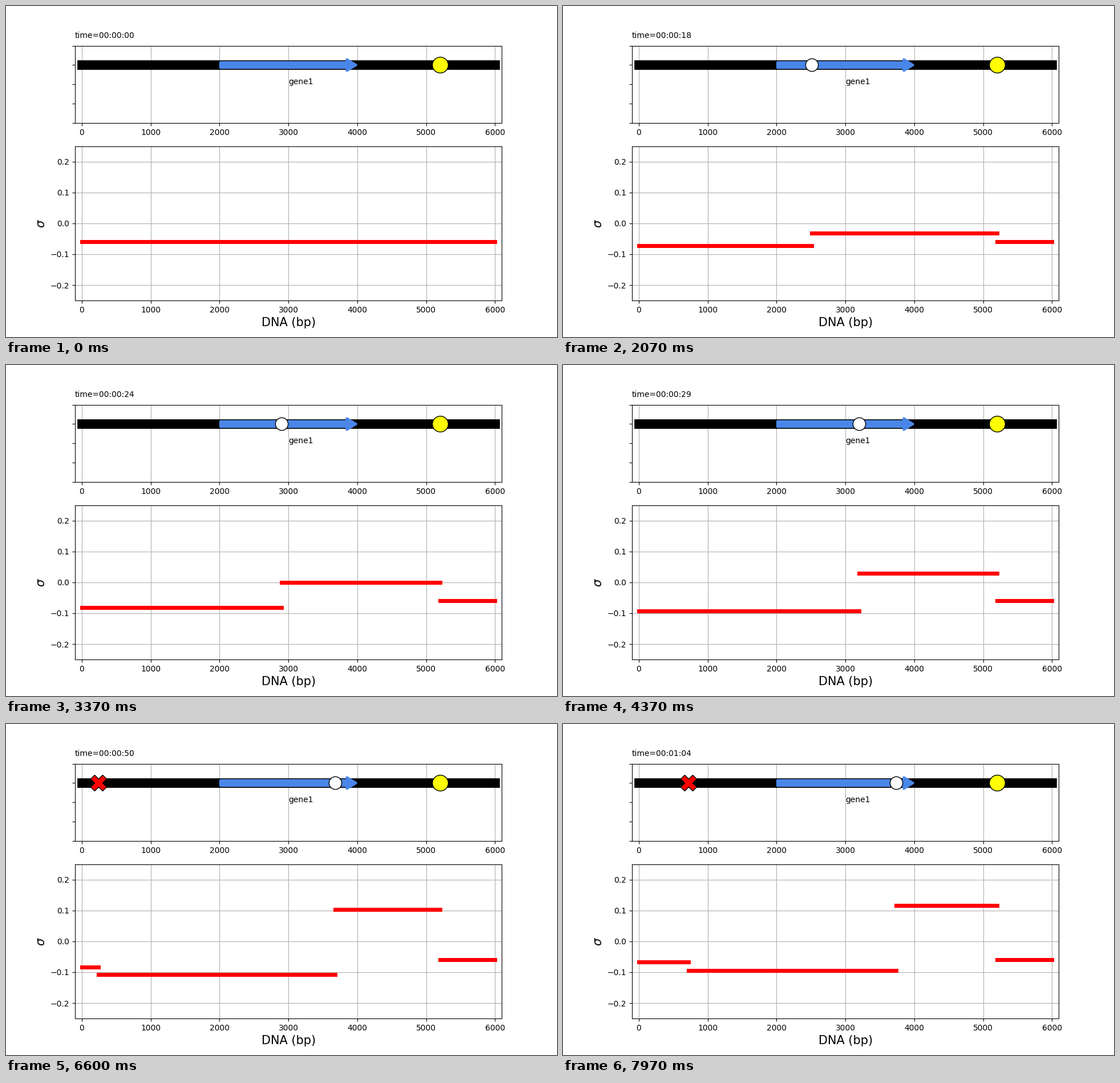
A matplotlib script for the animation above (8 s loop, 966 px wide and 580 px high).

```python
import numpy as np
import matplotlib.pyplot as plt
from matplotlib.animation import FuncAnimation
from matplotlib.patches import Polygon

LOOP, TICK = 8000, 20          # ms
DNA_LEN, BARRIER = 6000, 5200  # bp
START, STEP = 1970, 30         # polymerase start and stride, bp
SIGMA0, GAMMA = -0.06, 0.2055
STATES = 101

# topoisomerase visits: bind, leave, position, relaxation per step (left, right)
VISITS = [(14, 21, 1800, 3.3, 3.3),
          (35, 39, 2600, 3.3, 3.3),
          (78, 83, 240, 2.85, 1.55),
          (94, STATES, 720, 4.5, 4.5)]


def is_quick(k):
    """Idle states cover one second and are shown only briefly."""
    return k < 9 or 67 <= k < 78 or 85 <= k < 94


def polymerase(k):
    if k < 9:
        return None
    return START + STEP * (min(k - 9, 57) + int(np.clip(k - 83, 0, 2)))


def simulate():
    """List of (clock, polymerase, topoisomerase, segments) per state."""
    states, clock = [], 0.0
    left, right = SIGMA0 * START, 0.0
    ahead = SIGMA0 * (BARRIER - START)
    last = START
    for k in range(STATES):
        pos, topo = polymerase(k), None
        tail = (BARRIER, DNA_LEN, SIGMA0)
        if pos is None:
            segments = [(0, DNA_LEN, SIGMA0)]
        else:
            shift = GAMMA * (pos - last)
            last = pos
            ahead += shift
            right -= shift
            for bind, leave, site, gain_l, gain_r in VISITS:
                if bind < k <= leave:
                    left += gain_l
                    right += gain_r
                if bind <= k < leave:
                    topo = site
                if k == bind:
                    total = left + right
                    left = total * site / pos
                    right = total - left
            if topo is None:
                left, right = left + right, 0.0
                segments = [(0, pos, left / pos)]
            else:
                segments = [(0, topo, left / topo),
                            (topo, pos, right / (pos - topo))]
            segments += [(pos, BARRIER, ahead / (BARRIER - pos)), tail]
        states.append((clock, pos, topo, segments))
        clock += 1.0 if is_quick(k) else 0.5
    return states


states = simulate()
begins = np.cumsum([0] + [30 if is_quick(k) else 100 for k in range(STATES - 1)])

fig, (top, low) = plt.subplots(2, 1, figsize=(966 / 100, 580 / 100), dpi=100,
                               gridspec_kw={"height_ratios": [1, 2]})
for ax in (top, low):
    ax.set_xlim(-100, 6100)
    ax.set_xticks(range(0, 6001, 1000))

top.set_ylim(0, 2)
top.set_yticks(np.arange(0, 2.1, 0.5))
top.tick_params(labelleft=False)
top.grid(axis="x")
low.set_ylim(-0.25, 0.25)
low.set_yticks(np.arange(-2, 3) / 10)
low.grid()
low.set_xlabel("DNA (bp)", fontsize=15)
low.set_ylabel(r"$\sigma$", fontsize=15)

# DNA and gene
ROW = 1.5
top.plot([0, DNA_LEN], [ROW, ROW], color="black", lw=12, zorder=2)
upper = [(2014, 0.069), (3848, 0.069), (3848, 0.146)]
outline = upper + [(3982, 0)] + [(x, -y) for x, y in upper[::-1]]
top.add_patch(Polygon([(x, ROW + y) for x, y in outline], closed=True,
                      facecolor="#4a86e8", edgecolor="#4a86e8", lw=3,
                      joinstyle="round", zorder=3))
top.text(3000, 1.0, "gene1")
clock_text = top.text(-100, 2.2, "")


def marker(shape, size, color, z):
    return top.plot([BARRIER], [ROW], shape, ms=size, mfc=color,
                    mec="black", mew=1, zorder=z)[0]


marker("o", 20, "yellow", 5)
topo_mark = marker("X", 20, "red", 5)
pol_mark = marker("o", 16, "white", 6)
sigma_lines = [low.plot([], [], color="red", lw=5, zorder=3)[0] for _ in range(4)]


def place(mark, x):
    mark.set_visible(x is not None)
    if x is not None:
        mark.set_xdata([x])


def update(n):
    k = np.searchsorted(begins, n * TICK + TICK / 2, side="right") - 1
    clock, pos, topo, segments = states[k]
    s = int(clock)
    clock_text.set_text(f"time={s // 3600:02d}:{s // 60 % 60:02d}:{s % 60:02d}")
    place(pol_mark, pos)
    place(topo_mark, topo)
    for i, line in enumerate(sigma_lines):
        if i < len(segments):
            x0, x1, sigma = segments[i]
            line.set_data([x0, x1], [sigma, sigma])
        else:
            line.set_data([], [])
    return [clock_text, pol_mark, topo_mark, *sigma_lines]


anim = FuncAnimation(fig, update, frames=LOOP // TICK, interval=TICK,
                     init_func=lambda: update(0), repeat=True, repeat_delay=0)
plt.show()
```
